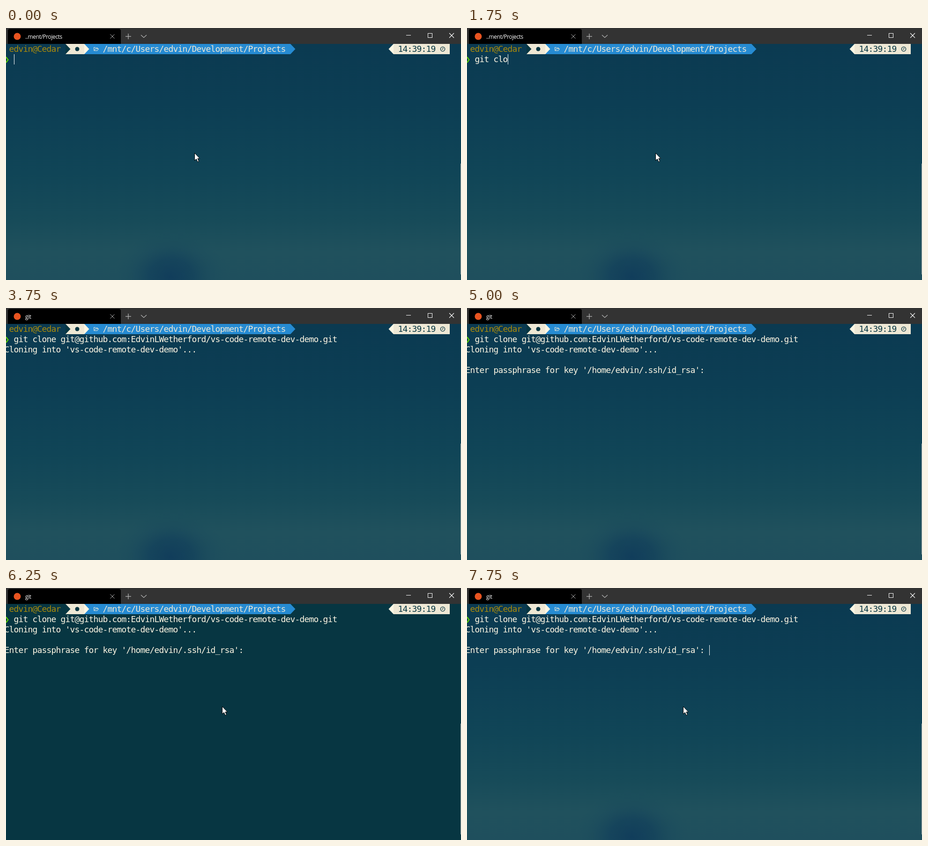
These frames come from a looping animation (971 px wide and 539 px high, 8 s). An HTML page with a canvas:

```html
<!DOCTYPE html>
<html lang="en">
<head>
<meta charset="utf-8">
<title>Terminal</title>
<style>
html, body { margin: 0; width: 100%; height: 100%; overflow: hidden; background: #073642; }
canvas { display: block; width: 971px; height: 539px; }
</style>
</head>
<body>
<canvas id="stage" width="971" height="539"></canvas>
<script>
const W = 971, H = 539, LOOP = 8000;
const CELL = 10, ROW = 22, LEFT = -3, TOP = 34;
const BASE = '#073642', CREAM = '#eee8d5', BLUE = '#268bd2', TEXT = '#fdf6e3';
const MONO = '18px "DejaVu Sans Mono", monospace';
const UI = '12px "Open Sans", sans-serif';
const COMMAND = 'git clone git@github.com:EdvinLWetherford/vs-code-remote-dev-demo.git';
const PASSPHRASE = "Enter passphrase for key '/home/edvin/.ssh/id_rsa': ";

// Event times in ms
const ENTER = 3000, ASK = 4250, BLUR = 5500, FOCUS = 6750;

const ctx = document.getElementById('stage').getContext('2d');

const colX = col => LEFT + col * CELL;
const rowY = row => TOP + row * ROW;
const between = (t, a, b) => t >= a && t < b;
const lerp = (a, b, k) => a + (b - a) * k;
const progress = (t, a, b) => Math.min(1, Math.max(0, (t - a) / (b - a)));

function rect(x, y, w, h, color) {
  ctx.fillStyle = color;
  ctx.fillRect(x, y, w, h);
}

function trace(points, closed) {
  ctx.beginPath();
  points.forEach(([x, y]) => ctx.lineTo(x, y));
  if (closed) ctx.closePath();
}

function shape(points, color) {
  trace(points, true);
  ctx.fillStyle = color;
  ctx.fill();
}

function line(points, color, width = 1) {
  trace(points, false);
  ctx.strokeStyle = color;
  ctx.lineWidth = width;
  ctx.stroke();
}

function disc(x, y, r, color) {
  ctx.beginPath();
  ctx.arc(x, y, r, 0, Math.PI * 2);
  ctx.fillStyle = color;
  ctx.fill();
}

// Terminal text sits on a fixed grid: one cell per character.
function print(str, col, row, color = TEXT) {
  ctx.font = MONO;
  ctx.fillStyle = color;
  [...str].forEach((ch, i) => ctx.fillText(ch, colX(col + i) - 0.4, rowY(row) + 17));
}

function drawBackdrop(acrylic) {
  rect(0, TOP, W, H - TOP, BASE);
  if (!acrylic) return;

  const sky = ctx.createLinearGradient(0, TOP, 0, H);
  const stops = [[0, '#0b3a51'], [0.25, '#0c3e54'], [0.55, '#104557'],
                 [0.75, '#174b59'], [0.88, '#20515d'], [1, '#1f4f5d']];
  stops.forEach(([at, color]) => sky.addColorStop(at, color));
  rect(0, TOP, W, H - TOP, sky);

  ctx.save();
  ctx.translate(352, 533);
  ctx.scale(1, 0.82);
  const glow = ctx.createRadialGradient(0, 0, 0, 0, 0, 120);
  glow.addColorStop(0, 'rgba(17,61,91,1)');
  glow.addColorStop(0.4, 'rgba(18,64,91,0.72)');
  glow.addColorStop(0.7, 'rgba(22,70,92,0.28)');
  glow.addColorStop(1, 'rgba(24,76,92,0)');
  rect(-120, -120, 240, 240, glow);
  ctx.restore();
}

function drawTitleBar(title) {
  rect(0, 0, W, TOP, '#333333');
  ctx.beginPath();
  ctx.roundRect(4, 2, 241, TOP - 2, [4, 4, 0, 0]);
  ctx.fillStyle = '#000';
  ctx.fill();
  disc(24, 18, 7.5, '#e95420');
  ctx.font = UI;
  ctx.letterSpacing = '-0.4px';
  ctx.fillStyle = '#fff';
  ctx.fillText(title, 41, 23);
  ctx.letterSpacing = '0px';

  const gray = '#b4b4b4';
  line([[222.5, 13.5], [231.5, 22.5]], gray);
  line([[231.5, 13.5], [222.5, 22.5]], gray);
  line([[255, 18], [267, 18]], gray, 1.3);
  line([[261, 12], [261, 24]], gray, 1.3);
  line([[288, 15], [294, 20.5], [300, 15]], gray, 1.2);

  line([[854, 15.5], [864, 15.5]], '#fff');
  ctx.strokeRect(900.5, 11.5, 9, 9);
  line([[946, 11], [956, 21]], '#fff', 1.1);
  line([[956, 11], [946, 21]], '#fff', 1.1);
}

function arrow(x, dir, color) {
  shape([[x, TOP], [x + dir * 10.5, TOP + 11], [x, TOP + ROW]], color);
}

function drawPrompt() {
  rect(127, TOP, 40, ROW, CREAM);
  rect(167, TOP, 440, ROW, BLUE);
  arrow(127, 1, BASE);
  arrow(167, 1, TEXT);
  arrow(607, 1, BLUE);
  print('edvin@Cedar', 1, 0, '#a8890c');
  disc(152, 45, 4.5, BASE);
  print('/mnt/c/Users/edvin/Development/Projects', 21, 0, CREAM);

  // Folder icon
  line([[188, 48.5], [187.5, 41.5], [190.5, 41.5], [191.5, 42.5], [195.5, 42.5],
        [195.5, 44.5], [190.5, 44.5], [188, 48.5], [195, 48.5], [197.5, 44.5],
        [195.5, 44.5]], CREAM);

  arrow(827, -1, TEXT);
  rect(827, TOP, 120, ROW, CREAM);
  print('14:39:19', 84, 0, BASE);
  ctx.beginPath();
  ctx.arc(932, 45, 4.6, 0, Math.PI * 2);
  ctx.strokeStyle = BASE;
  ctx.lineWidth = 1.4;
  ctx.stroke();
  line([[932.5, 42], [932.5, 45.5], [930, 45.5]], BASE);

  line([[0, 62], [4.5, 68], [0, 74]], '#5fd700', 2.2);
}

function typedCount(t) {
  if (t < 750) return 0;
  if (t < 2500) return Math.min(10, Math.floor(1 + (t - 750) * 0.006 + 1e-6));
  if (t < ENTER) return Math.min(COMMAND.length, Math.floor(10 + (t - 2500) * 0.05));
  return COMMAND.length;
}

function drawCaret(t, count) {
  let col, row;
  if (t < ENTER) {
    if (between(t, 250, 750)) return;
    [col, row] = [2 + count, 1];
  } else {
    const on = between(t, ASK, 4750) || between(t, 5250, BLUR) ||
               between(t, FOCUS, 7250) || t >= 7750;
    if (!on) return;
    [col, row] = [PASSPHRASE.length, 4];
  }
  rect(colX(col), rowY(row), 1, ROW, '#fff');
}

function drawPointer(t) {
  if (between(t, 3650, BLUR)) return;
  let x, y;
  if (t < BLUR) {
    const k = progress(t, 3050, 3650);
    [x, y] = [lerp(402, 430, k), lerp(267, 545, k * k)];
  } else {
    const k = progress(t, 5750, 6250);
    [x, y] = [lerp(419, 461, k), lerp(259, 253, k)];
  }
  ctx.save();
  ctx.translate(x + 0.5, y + 0.5);
  shape([[0, 0], [0, 16], [3.7, 12.6], [6.4, 18.8], [9, 17.7], [6.4, 11.6], [11, 11.6]], '#fff');
  ctx.strokeStyle = '#000';
  ctx.lineWidth = 1;
  ctx.stroke();
  ctx.restore();
}

function draw(t) {
  const count = typedCount(t);
  drawBackdrop(!between(t, BLUR, FOCUS));
  drawTitleBar(t < ENTER ? '..ment/Projects' : 'git');
  drawPrompt();
  print(COMMAND.slice(0, count), 2, 1);
  if (t >= ENTER) print("Cloning into 'vs-code-remote-dev-demo'...", 0, 2);
  if (t >= ASK) print(PASSPHRASE, 0, 4);
  drawCaret(t, count);
  rect(970, 290, 1, 237, '#a5acac');
  drawPointer(t);
}

const start = performance.now();
function tick() {
  draw((performance.now() - start) % LOOP);
  requestAnimationFrame(tick);
}
tick();
</script>
</body>
</html>
```
